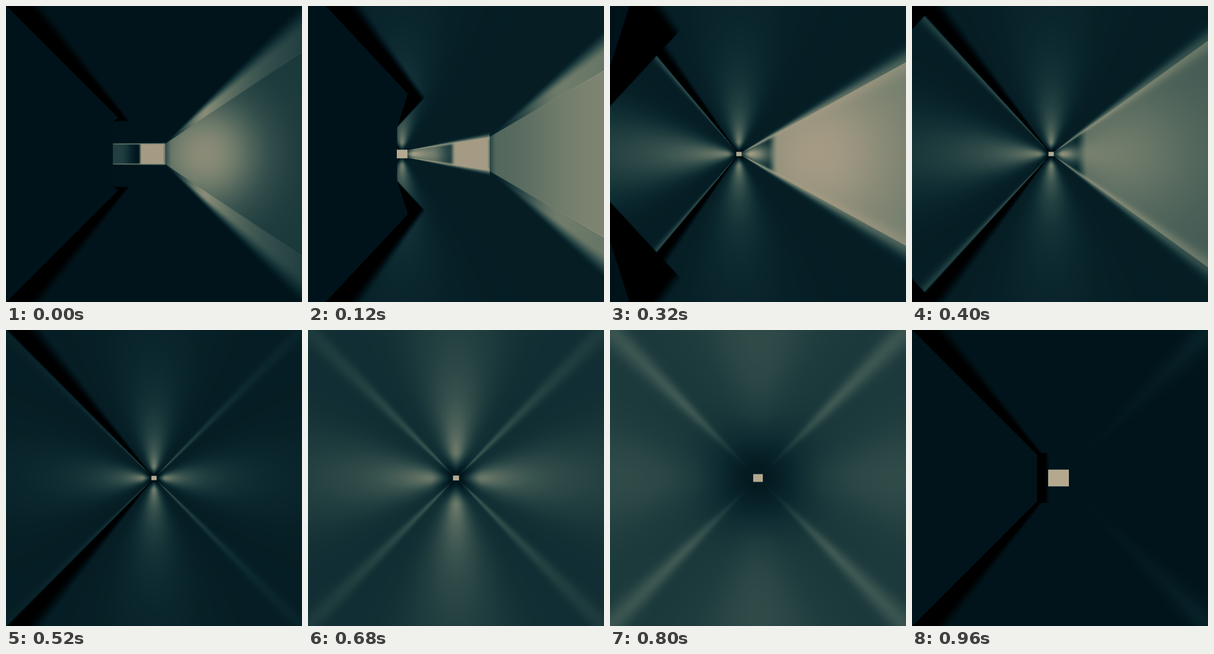
Animation of 500x500 px, one loop 1 s. Source, as an HTML page with a canvas:

```html
<!DOCTYPE html>
<html>
<head>
<meta charset="utf-8">
<style>
html, body { margin: 0; height: 100%; overflow: hidden; background: #000; }
canvas { display: block; width: 100vw; height: 100vh; }
</style>
</head>
<body>
<canvas id="stage" width="500" height="500"></canvas>
<script>
const SIZE = 500, MID = 250, LOOP = 1000, STEP = 40;
const TURN_END = 520;   // the camera has rounded the bend
const ctx = document.getElementById('stage').getContext('2d');
const image = ctx.createImageData(SIZE, SIZE);
const pixels = new Uint32Array(image.data.buffer);

const clamp = v => v < 0 ? 0 : v > 1 ? 1 : v;
const smooth = (a, b, v) => { v = clamp((v - a) / (b - a)); return v * v * (3 - 2 * v); };
const mix = (a, b, k) => a + (b - a) * k;
const bell = v => Math.exp(-v * v);

// Light that rises up to distance p and decays over R
function falloff(r, p, R) {
  if (r < p) return smooth(0, p, r);
  const q = (r - p) / R;
  return 1 / (1 + q + 0.3 * q * q);
}

// Black, deep teal, grey green, warm beige
const tones = [
  [0, 0, 0, 0], [.1, 1, 20, 27], [.2, 12, 42, 48], [.4, 55, 82, 78],
  [.6, 112, 124, 107], [.8, 165, 155, 132], [1, 215, 200, 170]
];
const palette = Uint32Array.from({ length: 1024 }, (_, i) => {
  const v = i / 1023;
  const n = Math.max(1, tones.findIndex(s => s[0] >= v));
  const a = tones[n - 1], b = tones[n], k = (v - a[0]) / (b[0] - a[0]);
  const [r, g, bl] = [1, 2, 3].map(c => Math.round(mix(a[c], b[c], k)));
  return (255 << 24 | bl << 16 | g << 8 | r) >>> 0;
});

function pose(t) {
  const turning = t < TURN_END;
  const ahead = clamp(1 - t / TURN_END);           // part of the bend still to go
  const bend = clamp(t / 120), sweep = (t / 120) ** 2;
  const flood = smooth(520, 800, t), late = smooth(800, 960, t);
  const reach = 20 + 220 * Math.max(0, (t - 520) / 280) ** 4;
  const lit = 1 - smooth(320, 520, t);

  const vx = MID - 135 * ahead ** 1.5 - 2.5 * late; // vanishing point
  const slope = (1 - ahead) ** 1.23;
  const edge = slope * (MID - vx) * (turning ? 1 : 0) + 17 * ahead ** 5;
  const door = 4.5 + 8 * clamp(1 - t / 280) + 13 * Math.max(0, (t - 560) / 400) ** 2.5;
  const cornerX = 268 + 38 * sweep;

  return {
    t, turning, bend, flood, late, reach, lit, vx, slope, edge, door, cornerX,
    base: .1 + .04 * bend + .13 * flood - .17 * late,
    glow: .48 * bend * (1 - smooth(600, 880, t)),
    stretch: 1 + 6 * ahead,
    beam: .42 + .4 * lit - .12 * flood,
    beamR: 3 * reach + 400 * lit,
    beamW: .01 + .06 * clamp(t / 320) + .05 * flood,
    left: clamp(t / 680) * (1 - late),
    leftSlope: 1 + (MID - vx) / 172 * (1 - late),
    wedge: 1 - smooth(560, 680, t),
    halo: 11 + 70 * flood ** 3,
    haloDepth: (.75 - .2 * flood) * (1 - late),
    litX: 226 + .15 * t,
    cornerH: edge + slope * (cornerX - MID),
    outSlope: mix(.68, .585, bend),
    near: turning ? 1 : smooth(800, 930, t),
    nearX: turning ? 180 - 30 * sweep : vx - 2.1 * door,
    nearH: turning ? 55 - 10 * bend : 2.2 * door,
    lineX: turning ? MID + 13 * bend : MID,
    lineS: turning ? 1 + .07 * bend : 1,
    slant: turning ? 1.5 - 1.18 * bend : 1.5,
    tip: turning ? 1.08 * bend : 0
  };
}

// Brightness of the lit side wall, before and after its corner
function litWall(p, x, dy, dark, outer) {
  if (outer) {
    const spot = bell(Math.hypot(x - 335, dy) / 95);
    const level = mix(.27 + .43 * spot, .5 + .15 * smooth(310, 500, x), p.bend);
    return level * mix(.7, 1, smooth(0, 12, x - p.cornerX));
  }
  const shine = .8 - .2 * (1 - bell(Math.hypot(x - 350, dy) / 130)) * smooth(120, 320, p.t);
  const gap = dark + .2 * p.lit * smooth(2, 34, p.litX - x);
  const soft = 3 + p.t / 50;
  return mix(gap, shine, p.lit * smooth(-soft, soft, x - p.litX))
    * mix(.75, 1, smooth(0, 4, p.cornerX - x));
}

// Wall ending on the left, with the shadow along its corner
function nearWall(p, x, dy, v) {
  const line = p.lineX - dy / p.lineS;
  const end = p.nearX + p.slant * Math.max(0, dy - p.nearH);
  const cut = smooth(-2, 3, dy - p.nearH - p.tip * (x - p.nearX));
  let shade = cut * clamp(x - Math.min(line, end) + 1)
    * (1 - smooth(dy * .14, dy * .26 + 2, x - line));
  if (!p.turning && dy < p.nearH + 4 && x >= p.nearX)
    shade = Math.max(shade, 1 - smooth(12, 22, x - p.nearX));
  const wall = clamp(line - x + .5) * clamp(end - x + .5);
  return mix(v * (1 - p.near * shade), p.turning ? .095 : p.base, p.near * wall);
}

function shadeAt(p, x, dy) {
  const dx = x + .5 - p.vx, ax = Math.abs(dx) + .01, right = dx > 0;
  const outer = p.turning && x > p.cornerX;
  const rise = outer ? p.cornerH + p.outSlope * (x - p.cornerX) : p.edge + p.slope * (x - MID);
  const span = outer ? x - p.cornerX + 5 : ax;
  // w is the slope above the corner line: negative on the side walls
  const w = right ? (dy - rise) / span : dy / ax - p.leftSlope;
  const inside = w < 0;

  let v = p.base;
  const r = inside ? ax : dy, spread = inside ? dy / ax : ax / dy;
  const R = 2.4 * p.reach * (inside && !right ? p.stretch : 1);
  v += p.glow * falloff(r, p.reach, R) * bell(spread / .36);
  v *= 1 - p.haloDepth * bell(Math.hypot(ax, dy) / p.halo);

  if (right && p.lit > 0) {
    const cover = clamp((rise - dy) / 2 + .5);
    if (cover > 0) v = mix(v, litWall(p, x, dy, v, outer), cover);
  }

  // Light along the corners
  let beam;
  if (outer) {
    beam = mix(.85, .7, p.bend) * falloff(span, mix(75, 130, p.bend), mix(120, 900, p.bend))
      * smooth(-.02, .01, w) * (1 - smooth(.12, .36, w));
  } else {
    beam = p.beam * falloff(ax, mix(20, p.reach, .5), p.beamR) * (right ? 1 : p.left)
      * bell(w / p.beamW);
  }
  v = mix(v, Math.max(v, .8), beam);

  if (!right) v *= 1 - p.wedge * smooth(-.01, .025, w) * (1 - smooth(.13, .36, w));

  const door = clamp(p.door - ax + .5) * clamp(p.door * .81 - dy + .5);
  if (p.near > 0) {
    const walled = nearWall(p, x, dy, v);
    v = p.turning && x < p.nearX ? walled : mix(walled, .86, door);
  } else {
    v = mix(v, .86, door);
  }
  return clamp(v);
}

function render(t) {
  const p = pose(t);
  for (let y = 0; y < MID; y++) {
    for (let x = 0; x < SIZE; x++) {
      const color = palette[Math.round(shadeAt(p, x, MID - y - .5) * 1023)];
      pixels[y * SIZE + x] = pixels[(SIZE - 1 - y) * SIZE + x] = color;
    }
  }
  ctx.putImageData(image, 0, 0);
}

let shown = -1;
function tick(now) {
  const t = Math.floor(now % LOOP / STEP) * STEP;
  if (t !== shown) render(shown = t);
  requestAnimationFrame(tick);
}
requestAnimationFrame(tick);
</script>
</body>
</html>
```
